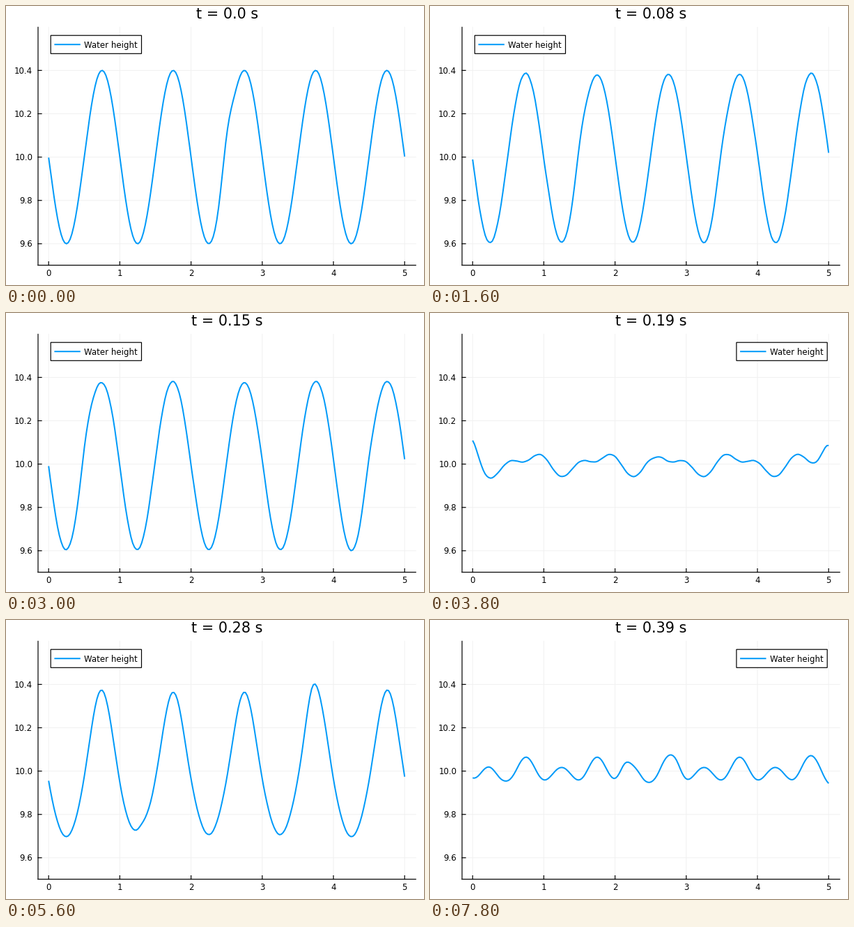
These frames come from a looping animation (600x400 px, 8000 ms). A matplotlib script:

```python
import numpy as np
import matplotlib.pyplot as plt
from matplotlib.animation import FuncAnimation
from matplotlib.patches import Rectangle

W, H, DPI = 600, 400, 100
PT = 72 / DPI                    # points per pixel
BLUE = "#009af9"
FRAMES, INTERVAL = 40, 200

LENGTH = 5.0
NODES = 200
DX = LENGTH / (NODES - 1)
PERIOD = LENGTH + DX             # periodic grid that repeats its end node
x = np.linspace(0, LENGTH, NODES)


def px(v):
    return 61.2 + 102.2 * v


def py(v):
    return 216.6 - 310.6 * (v - 10)


def centred(y):
    """Signed periodic distance from zero."""
    return np.mod(y + PERIOD / 2, PERIOD) - PERIOD / 2


def steepened(y, t, side):
    """One travelling half of the sine wave, steepening with time."""
    d = centred(y)
    # the seam of the grid shifts the phase by one cell and blurs with time
    seam = np.tanh((d + DX / 2) / (0.01 + 0.25 * t))
    a = 2 * np.pi * (d + DX * (1 - seam) / 2)
    return (-(0.1 - 0.01 * t) * np.sin(a)
            + side * 0.065 * t * np.sin(2 * a)
            - 0.06 * t ** 2 * np.sin(3 * a))


def bump(y, amp, t, side):
    """Travelling hump with a growing dip behind it."""
    d = centred(y - 2.5)
    hump = np.exp(-(d / 0.1) ** 2)
    wake = np.exp(-((d - side * 0.27) / 0.1) ** 2)
    return amp * (hump - 0.9 * t * wake)


def ripple(edge, dist, t):
    """Small grid noise running inwards from the boundary."""
    inside = np.clip((dist - edge) / 0.1, 0, 1)
    return 0.0022 * np.exp(-t / 0.13) * inside * np.sin(2 * np.pi * (edge - dist) / 0.105)


def clock(i):
    return max(0.01002 * i - 0.00513, 0.0)


def height(i):
    t = clock(i)
    dist = max(0.142 * (i - 0.62), 0.0)
    lag = max(dist - 0.06, 0.0)
    h = 10 - (0.2 - 0.02 * t) * np.sin(2 * np.pi * x)
    h += steepened(x + dist, t, 1) + steepened(x - dist, t, -1)
    h += bump(x + lag, 0.055 - 0.03 * t, t, 1)
    h += bump(x - lag, 0.045 - 0.04 * t, t, -1)
    h += ripple(x, dist, t) + ripple(LENGTH - x, dist, t)
    return h


plt.rcParams["font.family"] = "DejaVu Sans"
fig = plt.figure(figsize=(W / DPI, H / DPI), dpi=DPI, facecolor="white")
ax = fig.add_axes([0, 0, 1, 1])
ax.set_xlim(0, W)
ax.set_ylim(H, 0)
ax.axis("off")


def line(xs, ys, color="black", width=1.2, z=2, **kw):
    return ax.plot(xs, ys, color=color, lw=width * PT, zorder=z, snap=False, **kw)[0]


def label(xp, yp, text, size=11.8, ha="left", z=3):
    return ax.text(xp, yp, text, fontsize=size * PT, ha=ha, va="baseline",
                   color="black", zorder=z)


LEFT, RIGHT, TOP, BOTTOM = 46, 588.2, 30.4, 371.6
GRID = "#f1f1f1"

for v in range(6):
    p = px(v)
    line([p, p], [TOP, BOTTOM], GRID, 1, z=1)
    line([p, p], [BOTTOM, BOTTOM - 5])
    label(p, 387, str(v), ha="center")

for v in (9.6, 9.8, 10.0, 10.2, 10.4):
    p = py(v)
    line([LEFT, RIGHT], [p, p], GRID, 1, z=1)
    line([LEFT, LEFT + 5], [p, p])
    label(38.2, p + 4.3, f"{v:.1f}", ha="right")

line([LEFT, LEFT], [TOP, BOTTOM], solid_capstyle="projecting")
line([LEFT, RIGHT], [BOTTOM, BOTTOM], solid_capstyle="projecting")

title = label(317.3, 18, "", size=20.8, ha="center")
curve = line([], [], BLUE, 2, z=4, solid_joinstyle="round", solid_capstyle="butt")

box = Rectangle((64.2, 42.2), 130.3, 26.1, fc="white", ec="black",
                lw=1.2 * PT, zorder=5, snap=False)
ax.add_patch(box)
sample = line([], [], BLUE, 2, z=6, solid_capstyle="butt")
caption = label(112, 59.6, "Water height", z=6)


def place_legend(left):
    box.set_x(left)
    sample.set_data([left + 5.2, left + 42.6], [55.2, 55.2])
    caption.set_x(left + 47.8)


def draw(i):
    h = height(i)
    curve.set_data(px(x), py(h))
    title.set_text(f"t = {round(clock(i), 2)} s")
    place_legend(64.2 if h.max() > 10.25 else 439.9)
    return curve, title, box, sample, caption


def reset():
    return draw(0)


anim = FuncAnimation(fig, draw, frames=FRAMES, init_func=reset,
                     interval=INTERVAL, repeat=True, repeat_delay=0, blit=False)

plt.show()
```
